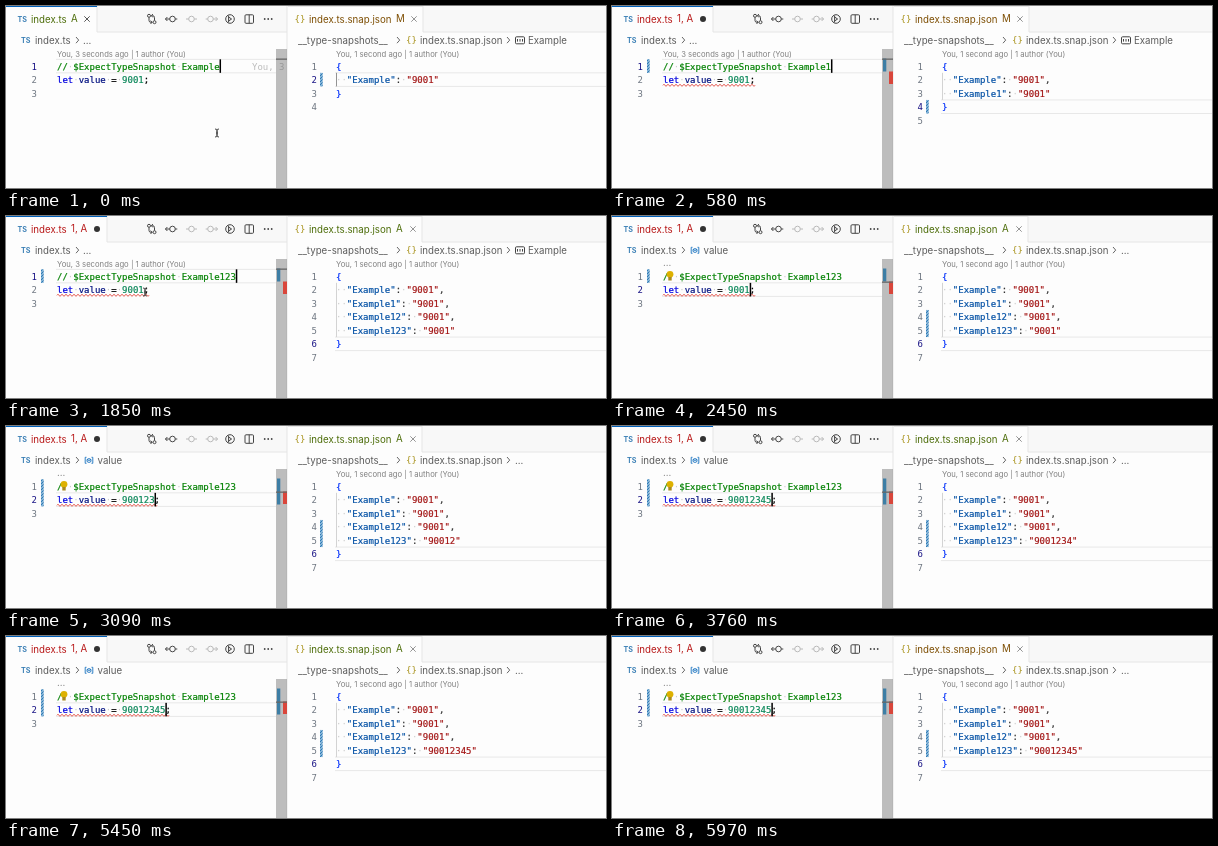
Recreate the animation shown at these times as an HTML page. Size 600 px wide and 182 px high, loop 6 s.

```html
<!DOCTYPE html>
<html lang="en">
<head>
<meta charset="utf-8">
<title>Type snapshots in the editor</title>
<style>
html, body { margin: 0; width: 100%; height: 100%; overflow: hidden; background: #fdfdfd; }
svg { display: block; width: 600px; height: 182px; }
text { font: 9.7px Inter, "Liberation Sans", sans-serif; white-space: pre; }
.code { font: 9px "DejaVu Sans Mono", "Liberation Mono", monospace; stroke-width: .2; }
.lens { font-size: 7.7px; }
.ts { font-size: 7.2px; font-weight: 700; }
.icon { fill: none; stroke: #444; stroke-width: 1; }
.dim { opacity: .35; }
</style>
</head>
<body>
<svg viewBox="0 0 600 182">
  <defs>
    <pattern id="hatch" width="3" height="3" patternUnits="userSpaceOnUse">
      <rect width="3" height="3" fill="#a9cde6"/>
      <path d="M-1 1L1 -1M0 3L3 0M2 4L4 2" stroke="#2a78b4" stroke-width="1.2"/>
    </pattern>
    <clipPath id="leftPane"><rect width="280" height="182"/></clipPath>
  </defs>
  <g id="scene"></g>
</svg>
<script>
const LOOP = 6000, CHAR = 5.418, ROW = 13.55;
const GREEN = '#4d6d0a', BROWN = '#7d4e03', RED = '#b81818', GREY = '#5c5c5c', LINE = '#e5e5e5';
const LEFT = { text: 51, number: 31, bar: 35, edge: 270 };
const RIGHT = { text: 330, number: 311, bar: 314, edge: 600 };
const scene = document.getElementById('scene');

const rowY = row => 53.3 + (row - 1) * ROW;
const rect = (x, y, w, h, fill) => `<rect x="${x}" y="${y}" width="${w}" height="${h}" fill="${fill}"/>`;
const path = (d, attrs = 'class="icon"') => `<path d="${d}" ${attrs}/>`;
const label = (x, y, s, fill = GREY, cls = '') => `<text x="${x}" y="${y}" fill="${fill}" class="${cls}">${s}</text>`;
const chevron = x => path(`M${x} 31l2.7 3.1l-2.7 3.1`, 'fill="none" stroke="#666"');
const braces = (x, y) => label(x, y, '{}', '#a8921a', 'code');
const cross = (x, colour) => path(`M${x - 2.7} 10.3l5.4 5.4m0 -5.4l-5.4 5.4`, `stroke="${colour}" stroke-width=".9"`);

// parts: [text, colour] pairs; spaces are shown as faint dots
function code(x, row, ...parts) {
  const spans = parts.map(([s, fill]) =>
    `<tspan fill="${fill}" stroke="${fill}">${s.replace(/ /g, '<tspan fill="#ccc" stroke="none">·</tspan>')}</tspan>`);
  return `<text x="${x}" y="${rowY(row) + 10.3}" class="code">${spans.join('')}</text>`;
}

function gutter(pane, count, active, changed) {
  const y = rowY(active);
  let out = path(`M${pane.text - 1} ${y}H${pane.edge}M${pane.text - 1} ${y + ROW}H${pane.edge}`,
    'stroke="#e8e8e8" stroke-width="1"');
  for (let n = 1; n <= count; n++)
    out += `<text x="${pane.number}" y="${rowY(n) + 10.3}" text-anchor="end" class="code"
      fill="${n === active ? '#171184' : '#6e7681'}">${n}</text>`;
  for (const n of changed) out += rect(pane.bar, rowY(n), 2.7, ROW, 'url(#hatch)');
  return out;
}

function squiggle(x, y, width) {
  let d = `M${x} ${y}`;
  for (let i = 0; i < Math.floor(width / 4); i++) d += 'q1 -2 2 0t2 0';
  return path(d, 'fill="none" stroke="#e03a30" stroke-width="1"');
}

const toolbar =
  '<g class="icon"><circle cx="143" cy="9.8" r="1.5"/><circle cx="148.5" cy="16.2" r="1.5"/>' +
  '<path d="M143 11.5v3q0 1.8 2 1.8h1M144.5 14.6l1.6 1.7l-1.6 1.7M148.5 14.5v-3q0 -1.8 -2 -1.8h-1M146.9 8l-1.6 1.7l1.6 1.7"/>' +
  '<circle cx="166.5" cy="13" r="2.8"/><path d="M163.7 13h-4.2m1.9 -2l-2 2l2 2M169.3 13h2"/>' +
  '<g class="dim"><circle cx="185.5" cy="13" r="2.8"/><path d="M180 13h2.7M188.3 13h2.7"/>' +
  '<circle cx="204.5" cy="13" r="2.8"/><path d="M199.7 13h2M207.3 13h4.2m-1.9 -2l2 2l-2 2"/></g>' +
  '<circle cx="224" cy="13" r="4.3"/><path d="M222.6 9.5v7M222.6 11l3 2l-3 2"/>' +
  '<rect x="239" y="8.8" width="8.5" height="8.5" rx="1"/><path d="M243.2 8.8v8.5"/></g>' +
  [258.7, 262.2, 265.7].map(x => `<circle cx="${x}" cy="13" r=".9" fill="#444"/>`).join('');

function tabs(error, dirty, added) {
  const leftEnd = error ? 101 : 91, tint = error ? RED : GREEN, snapTint = added ? GREEN : BROWN;
  const rightEnd = added ? 416 : 417, dotX = leftEnd - 10;
  return rect(leftEnd, 0, 281 - leftEnd, 26, '#f8f8f8') + rect(rightEnd, 0, 600 - rightEnd, 26, '#f8f8f8') +
    path(`M${leftEnd} 0V26H281M${rightEnd} 0V26H600M281 0V182`, `fill="none" stroke="${LINE}"`) +
    rect(0, 0, leftEnd, 1, '#005fb8') + rect(282, 0, rightEnd - 282, 1, LINE) +
    label(11.5, 15.8, 'TS', '#3a7fb5', 'ts') + label(25, 16.5, 'index.ts', tint) +
    label(65, 16.2, error ? '1, A' : 'A', tint) +
    (dirty ? `<circle cx="${dotX}" cy="13" r="3" fill="#333"/>` : cross(dotX, '#444')) +
    braces(288.5, 16.2) + label(303, 16.5, 'index.ts.snap.json', snapTint) +
    label(390, 16.2, added ? 'A' : 'M', snapTint) + cross(rightEnd - 9, '#888') + toolbar;
}

function breadcrumbs(clicked) {
  const symbol = path('M80.5 31.3h-1.3v6h1.3M85.5 31.3h1.3v6h-1.3M81 33.5l2 -1l2 1v2l-2 1l-2 -1zM81 33.5l2 1l2 -1',
    'fill="none" stroke="#1a73c0" stroke-width=".9"');
  const abc = '<rect x="509.5" y="30.8" width="9" height="7" rx="1" class="icon"/>' +
    path('M511.5 33v2.6M514 33v2.6M516.5 33v2.6');
  return label(15, 37, 'TS', '#3a7fb5', 'ts') + label(29, 37.7, 'index.ts') + chevron(70) +
    (clicked ? symbol + label(91.5, 37.7, 'value') : label(77, 37.7, '...')) +
    label(292, 37.7, '__type-snapshots__') + chevron(391) + braces(400, 37.4) +
    label(414, 37.7, 'index.ts.snap.json') + chevron(501) +
    (clicked ? label(509, 37.7, '...') : abc + label(522, 37.7, 'Example'));
}

function scrollbar(error, edited, row) {
  return (error ? rect(271, 52.5, 3.3, edited ? 26 : 13, '#2090d3') : '') +
    rect(270, 43, 11, 139, 'rgba(100, 100, 100, .42)') +
    (error ? rect(277, 65.5, 4, 12.5, '#d9463b') : '') +
    rect(270, row === 1 ? 52.5 : 65.5, 11, 1.3, '#666');
}

function mouse(t) {
  const stops = [[0, 211, 127], [1250, 211, 127], [1420, 136, 96], [1750, 139, 76], [2200, 139, 76]];
  if (t >= 30 && t < 1250 || t >= 2200) return '';
  const i = stops.findIndex(s => s[0] > t), [t0, x0, y0] = stops[i - 1], [t1, x1, y1] = stops[i];
  const k = (t - t0) / (t1 - t0), x = x0 + (x1 - x0) * k, y = y0 + (y1 - y0) * k;
  return path(`M${x - 2} ${y - 4}q2 0 2 1.3v5.4q0 1.3 -2 1.3M${x + 2} ${y - 4}q-2 0 -2 1.3v5.4q0 1.3 2 1.3M${x - 1} ${y}h2`);
}

function leftEditor(t, passed, error, clicked) {
  const suffix = '123'.slice(0, passed(30, 700, 1020));
  const digits = '9001' + '2345'.slice(0, passed(2600, 2950, 3300, 3650));
  const row = clicked ? 2 : 1, edited = digits.length > 4;
  const changed = suffix ? (edited ? [1, 2] : [1]) : [];
  const column = clicked ? 12 + digits.length : 30 + suffix.length;
  const bulb = rect(55.3, 54, 8, 12, '#fdfdfd') +
    '<circle cx="58" cy="58.3" r="3.4" fill="#ddb100"/>' + rect(56.3, 61, 3.4, 3.5, '#a88a20');
  return gutter(LEFT, 3, row, changed) +
    (clicked ? label(51, 49.5, '...', '#888') : label(51, 51.3, 'You, 3 seconds ago | 1 author (You)', '#808080', 'lens')) +
    code(51, 1, [`// $ExpectTypeSnapshot Example${suffix}`, '#008000']) +
    code(51, 2, ['let', '#0000e0'], [' value', '#001080'], [' = ', '#000'], [digits, '#098658'], [';', '#000']) +
    (error ? squiggle(51, 79.3, (13 + digits.length) * CHAR) : '') +
    (clicked ? bulb : '') +
    (suffix ? '' : `<g clip-path="url(#leftPane)">${label(246, 63.6, 'You, 3', '#bbb', 'code')}</g>`) +
    scrollbar(error, edited, row) +
    rect(51 + column * CHAR, rowY(row), 1.5, ROW, '#000');
}

function rightEditor(passed, clicked) {
  const saved = passed(450, 850, 1200);
  const last = '9001' + '2345'.slice(0, passed(2850, 3200, 3550, 3950));
  const changed = clicked ? [4, 5] : [[2], [4], [], []][saved];
  const active = saved ? saved + 3 : 2;
  let out = gutter(RIGHT, saved + 4, active, changed) +
    label(330, 51.3, 'You, 1 second ago | 1 author (You)', '#808080', 'lens') +
    path(`M330.5 ${rowY(2)}V${rowY(saved + 3)}`, `stroke="${saved ? '#d3d3d3' : '#939393'}"`) +
    code(330, 1, ['{', '#0431fa']);
  for (let i = 0; i <= saved; i++) {
    const end = i === saved;
    out += code(330, i + 2, [`  "Example${'123'.slice(0, i)}"`, '#0451a5'], [': ', '#333'],
      [`"${end ? last : '9001'}"`, '#a31515'], [end ? '' : ',', '#333']);
  }
  return out + code(330, saved + 3, ['}', '#0431fa']);
}

function draw(t) {
  const passed = (...times) => times.filter(time => t >= time).length;
  const error = t >= 360, clicked = t >= 2000, added = t >= 950 && t < 5600;
  scene.innerHTML = tabs(error, t >= 30, added) + breadcrumbs(clicked) +
    leftEditor(t, passed, error, clicked) + rightEditor(passed, clicked) + mouse(t);
}

const start = performance.now();
function tick() {
  draw((performance.now() - start) % LOOP);
  requestAnimationFrame(tick);
}
draw(0);
tick();
</script>
</body>
</html>
```
